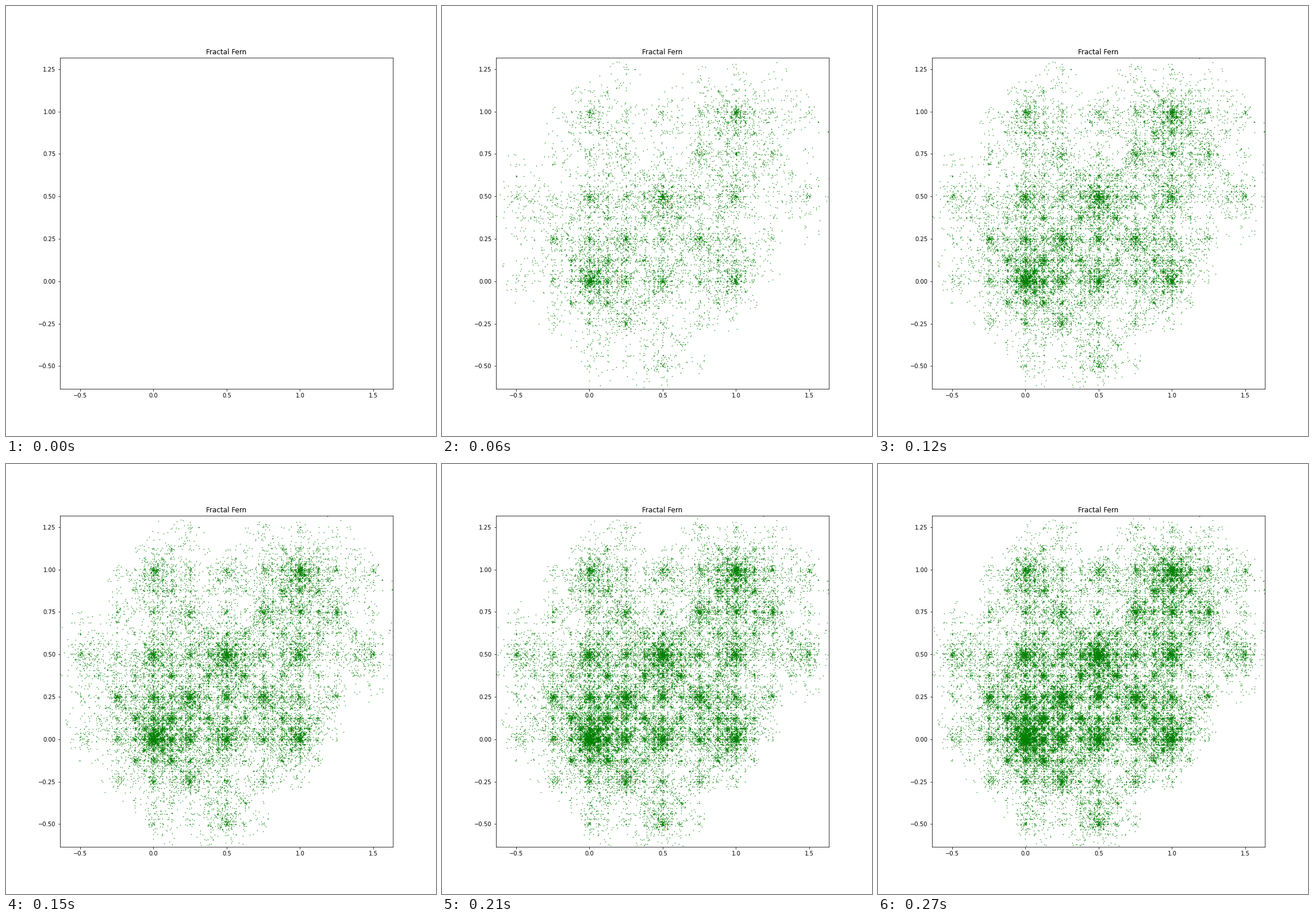
A matplotlib script for the animation above (0.3 s loop, 748 px wide and 748 px high).

```python
import random

import matplotlib.pyplot as plt
import numpy as np
from matplotlib.animation import FuncAnimation

SIZE, DPI = 748, 72
FRAMES, INTERVAL = 10, 30
STEP = 5000  # points added per frame

TURN = (1 + 1j) / 2
MAPS = (
    lambda z: TURN * z,
    lambda z: TURN * z.conjugate(),
    lambda z: 1 + 1j - TURN * z,
)
WEIGHTS = (0.3, 0.4, 0.3)


def chaos_game(count, seed=4):
    rng = random.Random(seed)
    z, points = 0j, []
    for pick in rng.choices(MAPS, WEIGHTS, k=count):
        z = pick(z)
        points.append(z)
    return np.array(points)


points = chaos_game(STEP * (FRAMES - 1))

fig, ax = plt.subplots(figsize=(SIZE / DPI, SIZE / DPI), dpi=DPI)
ax.set_title("Fractal Fern")
ax.set_xlim(-0.638, 1.634)
ax.set_ylim(-0.633, 1.318)
ax.set_xticks(np.arange(-0.5, 1.6, 0.5))
ax.set_yticks(np.arange(-0.5, 1.3, 0.25))
dots, = ax.plot([], [], ".", color="green", markersize=1)


def update(frame):
    shown = points[:frame * STEP]
    dots.set_data(shown.real, shown.imag)
    return dots,


anim = FuncAnimation(fig, update, frames=FRAMES, interval=INTERVAL,
                     init_func=lambda: update(0), repeat=True, repeat_delay=0)
plt.show()
```
